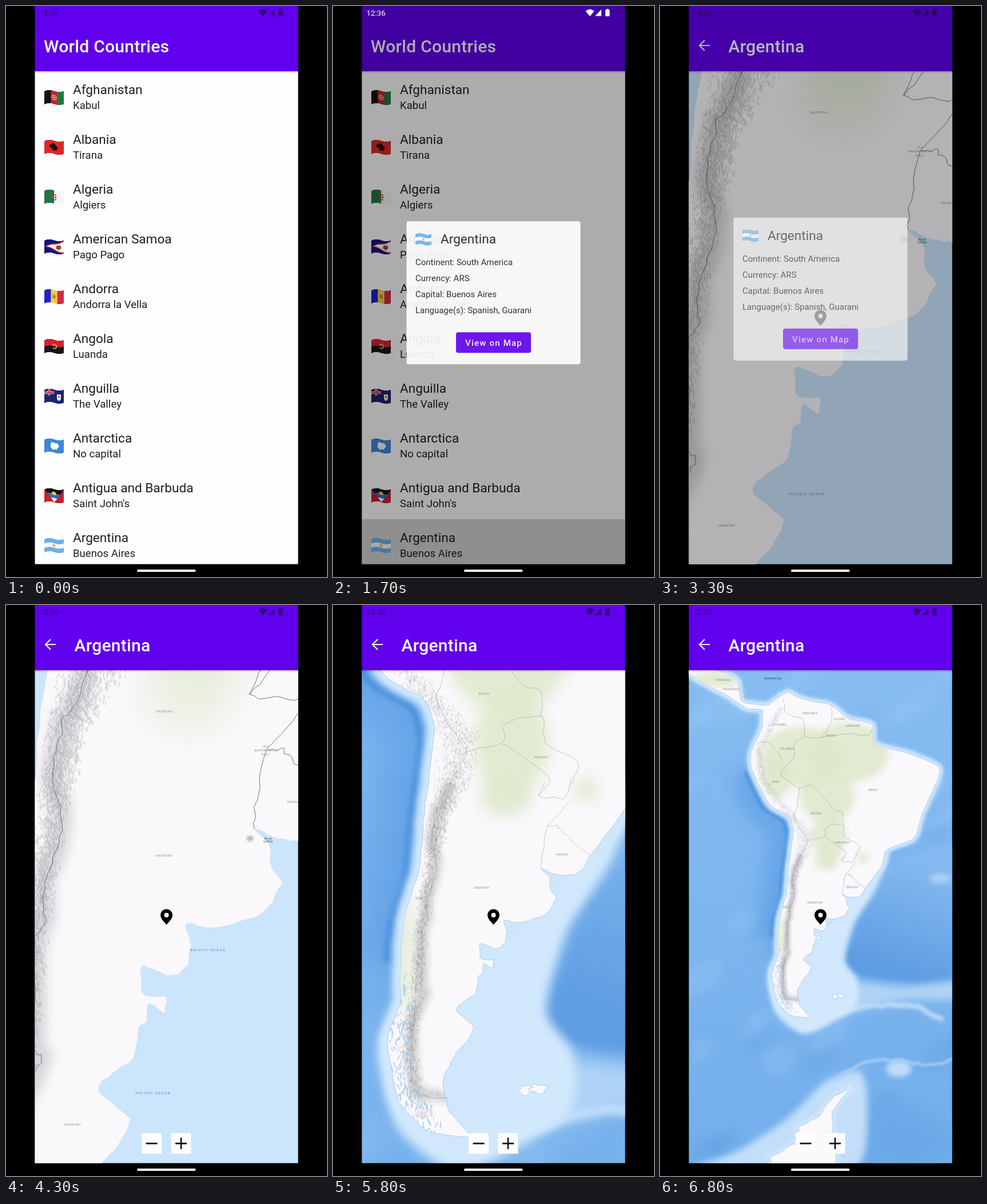
Write an HTML page with a canvas that moves like this. It is 561x998 px and loops after 6900 ms.

```html
<!DOCTYPE html>
<html lang="en">
<head>
<meta charset="utf-8">
<title>World Countries</title>
<style>
html, body { margin: 0; width: 100%; height: 100%; overflow: hidden; background: #000; }
canvas { display: block; }
</style>
</head>
<body>
<canvas id="stage" width="561" height="998"></canvas>
<script>
const ctx = document.getElementById('stage').getContext('2d');
const LOOP = 6900, CX = 280.5, CY = 544, TAU = Math.PI * 2;
const FAR = 0.25;
const APP = { x: 50.5, w: 460, bar: 114, bottom: 975.5 };
const PURPLE = '#6000ec', INK = '#1f1f21';

// ---------- helpers ----------
const clamp = v => Math.min(1, Math.max(0, v));
const ramp = (t, from, span) => clamp((t - from) / span);
const ease = f => 0.5 - Math.cos(Math.PI * f) / 2;
const pulse = (t, from, span) => Math.sin(Math.PI * ramp(t, from, span));

function seeded(s) {
  return () => {
    s = (s + 0x6D2B79F5) | 0;
    let r = Math.imul(s ^ (s >>> 15), 1 | s);
    r = (r + Math.imul(r ^ (r >>> 7), 61 | r)) ^ r;
    return ((r ^ (r >>> 14)) >>> 0) / 4294967296;
  };
}

function text(s, x, y, size, color, o = {}) {
  ctx.font = `${o.style || ''} ${o.weight || 400} ${size}px ${o.family || 'Roboto, sans-serif'}`;
  ctx.letterSpacing = (o.spacing || 0) + 'px';
  ctx.textAlign = o.align || 'left';
  ctx.fillStyle = color;
  ctx.fillText(s, x, y);
}

function rect(color, x, y, w, h, r = 0) {
  ctx.fillStyle = color;
  ctx.beginPath();
  ctx.roundRect(x, y, w, h, r);
  ctx.fill();
}

const appRect = (color, y, bottom) => rect(color, APP.x, y, APP.w, bottom - y);

// ---------- flags, 34 x 23 each ----------
function painter(g) {
  const p = {
    bar(c, x, y, w, h) { g.fillStyle = c; g.fillRect(x, y, w, h); },
    rows(...cs) { cs.forEach((c, i) => p.bar(c, 0, i * 23 / cs.length, 34, 23 / cs.length + 0.2)); },
    cols(...cs) { cs.forEach((c, i) => p.bar(c, i * 34 / cs.length, 0, 34 / cs.length + 0.2, 23)); },
    dot(c, x, y, r) { g.fillStyle = c; g.beginPath(); g.arc(x, y, r, 0, TAU); g.fill(); },
    tri(c, ...pts) { g.fillStyle = c; g.beginPath(); pts.forEach(q => g.lineTo(...q)); g.fill(); },
    arc(c, x, y, r, a, b, w) { g.strokeStyle = c; g.lineWidth = w; g.beginPath(); g.arc(x, y, r, a, b); g.stroke(); },
    // Irregular rounded patch
    blob(c, x, y, r, seed) {
      const rnd = seeded(seed);
      g.fillStyle = c; g.beginPath();
      for (let a = 0; a < TAU; a += TAU / 14) {
        const q = r * (0.7 + rnd() * 0.5);
        g.lineTo(x + Math.cos(a) * q * 1.15, y + Math.sin(a) * q);
      }
      g.fill();
    }
  };
  return p;
}

const flagArt = [
  p => { p.cols('#111', '#c8202c', '#1c7a3e'); p.arc('#eed', 17, 11.5, 4, 0, TAU, 1); p.dot('#e9c9c4', 17, 11.5, 1.6); },
  p => { p.rows('#dc2727'); p.blob('#1c0d0d', 17, 11.5, 6.5, 6); },
  p => { p.cols('#217544', '#f4f4f4'); p.arc('#d3253b', 17.5, 11.5, 4.5, 0.8, 5.5, 1.8); p.dot('#d3253b', 19.5, 11.5, 1.6); },
  p => {
    p.rows('#14147a');
    p.tri('#c32a3c', [0, 11.5], [34, 0], [34, 23]);
    p.tri('#fafafa', [4, 11.5], [34, 2], [34, 21]);
    p.blob('#80562a', 25, 11, 4.5, 8);
  },
  p => { p.cols('#2320c8', '#f2cf3c', '#d22a43'); p.bar('#d99a55', 14, 7.5, 6, 8); p.dot('#c4704c', 17, 11.5, 2); },
  p => { p.rows('#cf2433', '#161616'); p.arc('#e8cf62', 17, 11, 4.2, -1.3, 2.2, 1.4); p.dot('#e8cf62', 16, 9, 1.4); },
  p => {
    p.rows('#1b2470');
    p.bar('#eee', 0, 4, 17, 4); p.bar('#eee', 6.5, 0, 4, 12);
    p.bar('#cc2a3a', 0, 4.9, 17, 2.2); p.bar('#cc2a3a', 7.4, 0, 2.2, 12);
    p.bar('#f1efd8', 22, 7, 7, 8); p.dot('#f1efd8', 25.5, 14.5, 3.3); p.dot('#cf9843', 25.5, 11, 2);
  },
  p => { p.rows('#3e86d6'); p.blob('#f7f9fc', 17.5, 11.5, 7.2, 3); },
  p => {
    p.rows('#111', '#2b6cc4', '#fff'); p.dot('#f0cc3c', 17, 8.5, 4); p.bar('#2b6cc4', 0, 10, 34, 5.4);
    p.tri('#c8202f', [0, 0], [0, 23], [17, 23]);
    p.tri('#c8202f', [34, 0], [34, 23], [17, 23]);
  },
  p => { p.rows('#6ab1e8', '#f8f8f8', '#6ab1e8'); p.dot('#efb53c', 17, 11.5, 2.4); }
];

const flags = flagArt.map(art => {
  const c = document.createElement('canvas');
  c.width = 68; c.height = 46;
  const g = c.getContext('2d');
  g.scale(2, 2);
  art(painter(g));
  return c;
});

function flag(i, x, y, w) {
  const s = w / 34;
  for (let n = 0; n < w; n++) {
    const dy = -1.6 * s * Math.sin(n / w * TAU);
    ctx.drawImage(flags[i], n / w * 68, 0, 68 / w, 46, x + n, y - 11.5 * s + dy, 1, 23 * s);
  }
}

// ---------- map geometry, in units of the closest zoom ----------
const unit = (k, x, y) => [(x - CX) / k, (y - CY) / k];
const near = (...pts) => pts.map(p => unit(1, ...p));
const far = (...pts) => pts.map(p => unit(FAR, ...p));

// Smooth curve through key points, with seeded wobble for a natural edge
function curve(keys, { closed = false, wobble = 0.05, seed = 1, steps = 5 } = {}) {
  const rnd = seeded(seed), n = keys.length, out = [];
  const key = i => keys[closed ? (i + n) % n : Math.min(n - 1, Math.max(0, i))];
  for (let i = 0; i < (closed ? n : n - 1); i++) {
    const [a, b, c, d] = [key(i - 1), key(i), key(i + 1), key(i + 2)];
    const reach = Math.min(40, Math.hypot(c[0] - b[0], c[1] - b[1])) * wobble;
    for (let j = 0; j < steps; j++) {
      const f = j / steps;
      const point = m => b[m] + f * (c[m] - a[m]) / 3 +
        f * f * (3 * (c[m] - b[m]) - 2 * (c[m] - a[m]) / 3 - (d[m] - b[m]) / 3) +
        f * f * f * (2 * (b[m] - c[m]) + (c[m] - a[m]) / 3 + (d[m] - b[m]) / 3);
      out.push([0, 1].map(m => point(m) + (rnd() - 0.5) * 2 * reach));
    }
  }
  if (!closed) out.push(key(n - 1));
  return out;
}

const caribbean = far([178, 184], [152, 181], [120, 160], [75, 136], [40, 112], [40, 95], [95, 112], [134, 130],
  [142, 168], [170, 174], [190, 174], [222, 153], [250, 165], [298, 175]);
const atlantic = far([330, 199], [370, 208], [376, 243], [430, 258], [488, 284], [478, 322], [458, 365],
  [444, 407], [396, 428], [388, 455], [361, 492], [349, 509]);
const gulfs = near([505, 412], [475, 408], [433, 391], [462, 420], [463, 455], [482, 487], [447, 540], [362, 565],
  [317, 557], [323, 595], [316, 630], [290, 649], [238, 632], [241, 681], [279, 686], [276, 712], [250, 697],
  [245, 728], [232, 740], [222, 792], [170, 830], [165, 854], [217, 897], [195, 945], [165, 975]);
const tip = far([248, 659], [240, 676], [245, 701], [262, 721], [228, 717], [205, 693], [195, 645], [205, 615]);
const pacific = far([206, 575], [209, 545], [221, 505], [224, 468], [229, 430], [233, 395], [225, 370], [190, 347],
  [160, 285], [160, 255], [178, 215]);
const mainland = curve([...caribbean, ...atlantic, ...gulfs, ...tip, ...pacific], { closed: true, seed: 5 });
const antarctic = curve(far([343, 838], [300, 862], [275, 895], [242, 914], [238, 940], [193, 965], [205, 990],
  [298, 990], [304, 930], [302, 880]), { closed: true, wobble: 0.35, seed: 9 });

function island(x, y, r, seed) {
  const rnd = seeded(seed);
  return far(...Array.from({ length: 16 }, (_, i) => {
    const a = i / 16 * TAU, q = r * (0.6 + rnd() * 0.6);
    return [x + Math.cos(a) * q, y + Math.sin(a) * q * 0.7];
  }));
}
const lands = [mainland, antarctic, island(306, 684, 6, 2), island(317, 683, 7, 6)];

const andes = near([143, 114], [118, 180], [100, 200], [90, 250], [79, 300], [98, 365], [88, 430], [66, 485],
  [68, 550], [51, 590], [52, 690], [51, 778], [62, 788], [50, 822], [18, 888], [26, 1108], [134, 1128]);
const borders = [
  andes,
  near([446, 114], [427, 157], [480, 163], [515, 160], [530, 100]),
  near([525, 175], [458, 255], [440, 330], [434, 391]),
  near([458, 255], [485, 253], [510, 283], [590, 345]),
  far([246, 437], [258, 411], [241, 386], [233, 363]),
  far([258, 411], [288, 405], [290, 388], [319, 384], [322, 404], [349, 420], [343, 438]),
  far([288, 405], [325, 432], [317, 447]),
  far([319, 384], [319, 363], [303, 357], [265, 315], [244, 320], [211, 295], [233, 268], [236, 240], [252, 230],
    [250, 200], [222, 190], [215, 165]),
  far([168, 243], [190, 240], [215, 270]),
  far([244, 320], [240, 350], [232, 372]),
  far([252, 230], [280, 232], [300, 203], [300, 178]),
  far([280, 232], [325, 225], [362, 228], [372, 215])
].map((keys, i) => curve(keys, { wobble: 0.09, seed: 20 + i }));

const greens = [[245, 265, 70, 52], [330, 258, 70, 52], [205, 300, 26, 36], [292, 335, 48, 45],
  [295, 405, 30, 42], [290, 448, 20, 16], [355, 442, 9, 10], [208, 575, 7, 50], [100, 130, 45, 14]];

// Mountain chain: centre and half width
const chain = [[212, 178, 8], [172, 255, 8], [180, 305, 10], [222, 360, 16], [254, 398, 20], [250, 430, 18],
  [238, 460, 11], [231, 495, 8], [222, 555, 7], [217, 615, 7], [211, 655, 9], [225, 705, 11]];

const ridges = (() => {
  const rnd = seeded(77), out = [];
  for (let i = 0; i < 7000; i++) {
    const u = rnd() * (chain.length - 1), n = Math.floor(u);
    const [x, y, w] = chain[n].map((v, m) => v + (chain[n + 1][m] - v) * (u - n));
    const [px, py] = unit(FAR, x + (rnd() + rnd() - 1) * w, y + (rnd() - 0.5) * 4);
    out.push([px, py, (rnd() - 0.5) * 10, 2 + rnd() * 8]);
  }
  return out;
})();

function scatter(seed, n, x, y, w, h) {
  const rnd = seeded(seed);
  return far(...Array.from({ length: n }, () => [x + rnd() * w, y + rnd() * h]));
}
const swells = scatter(4, 50, 40, 110, 480, 870);
const fjords = [...scatter(12, 110, 197, 590, 18, 100), ...scatter(13, 50, 208, 680, 30, 38)];

function trace(pts) {
  ctx.beginPath();
  pts.forEach(p => ctx.lineTo(p[0], p[1]));
}

function blurred(k, blur, paint) {
  ctx.filter = `blur(${blur * k / FAR}px)`;
  paint();
  ctx.filter = 'none';
}

function glow(k, pts, color, blur, width) {
  blurred(k, blur, () => {
    trace(pts);
    ctx.strokeStyle = color;
    ctx.lineWidth = width / FAR;
    ctx.stroke();
  });
}

function patch(k, pts, color, blur) {
  blurred(k, blur, () => {
    trace(pts);
    ctx.fillStyle = color;
    ctx.fill();
  });
}

function oval(k, x, y, rx, ry, color, blur) {
  blurred(k, blur, () => {
    ctx.fillStyle = color;
    ctx.beginPath();
    ctx.ellipse(...unit(FAR, x, y), rx / FAR, ry / FAR, 0, 0, TAU);
    ctx.fill();
  });
}

function shade(from, to, c0, c1) {
  const g = ctx.createLinearGradient(...unit(FAR, ...from), ...unit(FAR, ...to));
  g.addColorStop(0, c0);
  g.addColorStop(1, c1);
  return g;
}

const ring = keys => curve(keys, { closed: true, wobble: 0 });
const basin = ring(far([560, 420], [430, 445], [386, 500], [350, 550], [326, 605], [326, 638], [380, 655], [560, 648]));
const shelf = ring(far([400, 430], [375, 500], [340, 555], [322, 620], [345, 655], [340, 705], [255, 750], [203, 715],
  [188, 650], [215, 600], [290, 560]));
const southShelf = ring(far([40, 990], [130, 958], [225, 895], [290, 832], [350, 815], [362, 870], [335, 990]));
const bank = ring(far([330, 660], [430, 668], [540, 655], [540, 690], [430, 690], [300, 712]));
const scotia = curve(far([262, 722], [335, 707], [400, 699], [450, 703], [495, 725]), { wobble: 0.3 });
const southArc = curve(far([300, 832], [350, 802], [420, 796], [470, 805], [530, 785]), { wobble: 0.3 });
const westward = pacific.slice(0, -2).map(([x, y]) => [x - 11 / FAR, y + 6 / FAR]);
const trench = curve(westward, { wobble: 0 });

function drawOcean(k) {
  ctx.fillStyle = shade([200, 110], [260, 900], '#86bcf1', '#75b0ec');
  ctx.fillRect(-2000, -2000, 4000, 4000);
  blurred(k, 9, () => swells.forEach(([x, y], i) => {
    ctx.fillStyle = i % 3 ? 'rgba(165,207,247,.25)' : 'rgba(78,144,220,.2)';
    ctx.beginPath();
    ctx.ellipse(x, y, 90 + i % 5 * 26, 45 + i % 4 * 16, -0.6, 0, TAU);
    ctx.fill();
  }));
  glow(k, trench, 'rgba(78,147,225,.5)', 16, 60);
  patch(k, basin, shade([450, 440], [380, 630], '#84baf0', '#5f9de2'), 5);
  oval(k, 430, 940, 80, 60, '#6ba8e7', 14);
  patch(k, bank, '#b0d3f6', 7);
  patch(k, southShelf, '#c2def9', 6);
  glow(k, scotia, '#c2def9', 3, 8);
  glow(k, southArc, '#b0d3f6', 2, 4);
  oval(k, 417, 811, 22, 14, '#bedcf8', 4);
  oval(k, 490, 478, 20, 8, '#aed1f5', 5);
  glow(k, trench, '#488edc', 2, 5);
  glow(k, mainland, '#b4d6f8', 3, 14);
  patch(k, shelf, '#d2e8fc', 4);
  glow(k, mainland, '#d0e7fc', 2, 9);
  glow(k, antarctic, '#cfe6fb', 3, 12);
}

function drawRelief(k, close) {
  ctx.globalAlpha = close ? 0.4 : 0.8;
  greens.forEach(g => oval(k, ...g, '#dce8c8', 6));
  ctx.globalAlpha = 1;
  glow(k, andes, 'rgba(110,110,115,.25)', 2.5, 9);
  ctx.strokeStyle = 'rgba(95,95,100,.25)';
  ctx.lineWidth = 1.3;
  ctx.beginPath();
  ridges.forEach(([x, y, dx, dy]) => { ctx.moveTo(x, y); ctx.lineTo(x + dx, y + dy); });
  ctx.stroke();
  if (close) return;
  ctx.strokeStyle = '#a9cff2';
  ctx.lineWidth = 3;
  ctx.beginPath();
  fjords.forEach(([x, y], i) => { ctx.moveTo(x, y); ctx.lineTo(x + 10 - i % 5 * 5, y + 10 + i % 3 * 6); });
  ctx.stroke();
}

function drawLand(k, close) {
  lands.forEach(pts => {
    trace(pts);
    ctx.closePath();
    ctx.fillStyle = '#faf8fb';
    ctx.fill();
    ctx.strokeStyle = close ? '#c4def4' : '#97c3ec';
    ctx.lineWidth = 0.8 / k;
    ctx.stroke();
  });
  ctx.save();
  trace(mainland);
  ctx.clip();
  drawRelief(k, close);
  if (close) oval(k, 317, 510, 1.4, 1.2, 'rgba(110,110,110,.5)', 0.5);
  ctx.restore();
  ctx.strokeStyle = close ? '#717174' : 'rgba(125,130,130,.6)';
  ctx.lineWidth = (close ? 1 : 0.7) / k;
  borders.forEach(b => { trace(b); ctx.stroke(); });
}

// Label places are given on the widest view
const nations = [['VENEZUELA', 262, 191], ['COLOMBIA', 209, 211], ['COLOMBIA', 222, 253], ['GUYANA', 314, 201],
  ['SURINAME', 337, 213], ['BRAZIL', 299, 230], ['BRAZIL', 373, 325], ['PERU', 202, 311], ['BOLIVIA', 273, 366],
  ['PARAGUAY', 319, 417], ['URUGUAY', 336, 495], ['ARGENTINA', 271, 522], ['CHILE', 221, 530],
  ['HONDURAS', 110, 133], ['NICARAGUA', 125, 149]];
const details = [['ARGENTINA', 277, 188], ['ARGENTINA', 276, 440], ['ARGENTINA', 116, 910], ['ISLA', 454, 249],
  ['MARTIN GARCIA', 455, 256], ['(ARG.)', 454, 263], ['URUGUAY', 503, 346]];
const seas = [['PACIFIC OCEAN', 353, 605], ['PACIFIC OCEAN', 257, 855]];

function drawLabels(k, close) {
  const small = { align: 'center', spacing: 0.3 };
  const serif = { family: '"Noto Serif", serif', style: 'italic', align: 'center' };
  if (close) {
    details.forEach(([s, x, y]) => text(s, x, y, 5, '#8f8f91', small));
    seas.forEach(([s, x, y]) => text(s, x, y, 5.8, '#4f779f', { ...serif, spacing: 1.4 }));
    text('Río de', 458, 410, 4.6, '#24456a', serif);
    text('la Plata', 458, 415, 4.6, '#24456a', serif);
    return;
  }
  const place = (x, y) => [CX + (x - CX) * k / FAR, CY + (y - CY) * k / FAR];
  nations.forEach(([s, x, y]) => text(s, ...place(x, y), 4.5, '#88888a', small));
  text('Caribbean Sea', ...place(197, 130), 4.6, '#24456a', serif);
}

function drawPin() {
  ctx.fillStyle = '#000';
  ctx.beginPath();
  ctx.arc(CX, 542, 10.5, Math.PI, 0);
  ctx.bezierCurveTo(291, 549, 283, 555, CX, 559);
  ctx.bezierCurveTo(278, 555, 270, 549, 270, 542);
  ctx.fill();
  ctx.fillStyle = '#fff';
  ctx.beginPath();
  ctx.arc(CX, 542, 4, 0, TAU);
  ctx.fill();
}

function drawZoomButtons() {
  for (const x of [254.5, 306]) {
    rect('#fdfdfd', x - 17.5, 923, 35, 36, 1);
    rect('#111', x - 10, 939.8, 20, 2.6);
  }
  rect('#111', 304.7, 931, 2.6, 20);
}

function drawMap(t) {
  const k = 2 ** -(ease(ramp(t, 5412, 500)) + ease(ramp(t, 6300, 500)));
  const close = k > 0.9;
  ctx.save();
  ctx.beginPath();
  ctx.rect(APP.x, APP.bar, APP.w, APP.bottom - APP.bar);
  ctx.clip();
  ctx.save();
  ctx.translate(CX, CY);
  ctx.scale(k, k);
  ctx.lineJoin = 'round';
  if (close) {
    ctx.fillStyle = '#cbe5fd';
    ctx.fillRect(-400, -500, 800, 1000);
  } else drawOcean(k);
  drawLand(k, close);
  ctx.restore();
  drawLabels(k, close);
  drawPin();
  if (t >= 4300) drawZoomButtons();
  ctx.restore();
}

// ---------- screens ----------
const countries = [
  ['Afghanistan', 'Kabul'], ['Albania', 'Tirana'], ['Algeria', 'Algiers'], ['American Samoa', 'Pago Pago'],
  ['Andorra', 'Andorra la Vella'], ['Angola', 'Luanda'], ['Anguilla', 'The Valley'], ['Antarctica', 'No capital'],
  ['Antigua and Barbuda', "Saint John's"], ['Argentina', 'Buenos Aires']
];

function drawList(t) {
  appRect('#fefdff', APP.bar, APP.bottom);
  appRect(`rgba(0,0,0,${0.18 * pulse(t, 1350, 600)})`, 897, APP.bottom);
  countries.forEach(([name, capital], i) => {
    const y = 87 * i;
    flag(i, 67, 160 + y, 34);
    text(name, 117, 154 + y, 22.6, INK);
    text(capital, 117, 180 + y, 18.6, INK);
  });
}

function drawStatus(color) {
  text('12:36', 58.5, 17, 13.4, color);
  ctx.fillStyle = color;
  ctx.beginPath();
  ctx.moveTo(449, 18);
  ctx.lineTo(441.5, 9);
  ctx.quadraticCurveTo(449, 2.5, 456.5, 9);
  ctx.fill();
  ctx.beginPath();
  ctx.moveTo(458, 17.5);
  ctx.lineTo(469, 17.5);
  ctx.lineTo(469, 6);
  ctx.fill();
  rect(color, 476, 6.5, 7.5, 11.5, 1);
  rect(color, 478, 5, 3.5, 2);
}

function drawBar(onMap) {
  const shadow = ctx.createLinearGradient(0, APP.bar, 0, APP.bar + 4);
  shadow.addColorStop(0, 'rgba(0,0,0,.2)');
  shadow.addColorStop(1, 'rgba(0,0,0,0)');
  appRect(shadow, APP.bar, APP.bar + 4);
  appRect(PURPLE, 0, APP.bar);
  const title = { weight: 500, spacing: 0.25 };
  if (!onMap) return text('World Countries', 66, 80.5, 30, '#fff', title);
  text('Argentina', 119.5, 80.5, 30, '#fff', title);
  ctx.strokeStyle = '#fff';
  ctx.lineWidth = 2.2;
  ctx.beginPath();
  ctx.moveTo(87, 69);
  ctx.lineTo(69, 69);
  ctx.moveTo(78, 60);
  ctx.lineTo(69, 69);
  ctx.lineTo(78, 78);
  ctx.stroke();
}

const facts = ['Continent: South America', 'Currency: ARS', 'Capital: Buenos Aires', 'Language(s): Spanish, Guarani'];

function drawDialog(t, alpha, dy) {
  ctx.save();
  ctx.globalAlpha = alpha;
  ctx.translate(0, dy);
  rect('#fff', 128.5, 374, 304, 250, 4);
  flag(9, 144, 405.5, 28);
  text('Argentina', 188, 413, 22.6, INK);
  facts.forEach((s, i) => text(s, 144, 451 + 28 * i, 15, INK));
  rect(PURPLE, 215, 568, 131, 36, 4);
  rect(`rgba(255,255,255,${0.22 * pulse(t, 2750, 600)})`, 215, 568, 131, 36, 4);
  text('View on Map', 231, 592, 15, '#fff', { weight: 500, spacing: 1.2 });
  ctx.restore();
}

function draw(t) {
  const leave = ramp(t, 3200, 190);
  const scrim = 0.6 * ease(ramp(t, 1480, 420)) * (1 - leave);
  const dialog = ramp(t, 1500, 220) * (1 - leave ** 1.5);
  const shift = 6 * (1 - ease(ramp(t, 1500, 350))) - 8 * leave;
  const onMap = t >= 3100;
  const lit = t >= 1600 && t < 3200;

  rect('#000', 0, 0, 561, 998);
  if (onMap) drawMap(t); else drawList(t);
  drawBar(onMap);
  if (!lit) drawStatus('#330a80');
  appRect(`rgba(0,0,0,${scrim})`, 0, APP.bottom);
  if (lit) drawStatus('#fff');
  if (dialog) drawDialog(t, dialog, shift);
  rect('#fff', 229, 985, 102.5, 4, 2);
}

const start = performance.now();
let shown = -1;
function tick() {
  const t = Math.floor((performance.now() - start) % LOOP / 100) * 100;
  if (t !== shown) {
    shown = t;
    draw(t);
  }
  requestAnimationFrame(tick);
}
tick();
</script>
</body>
</html>
```
